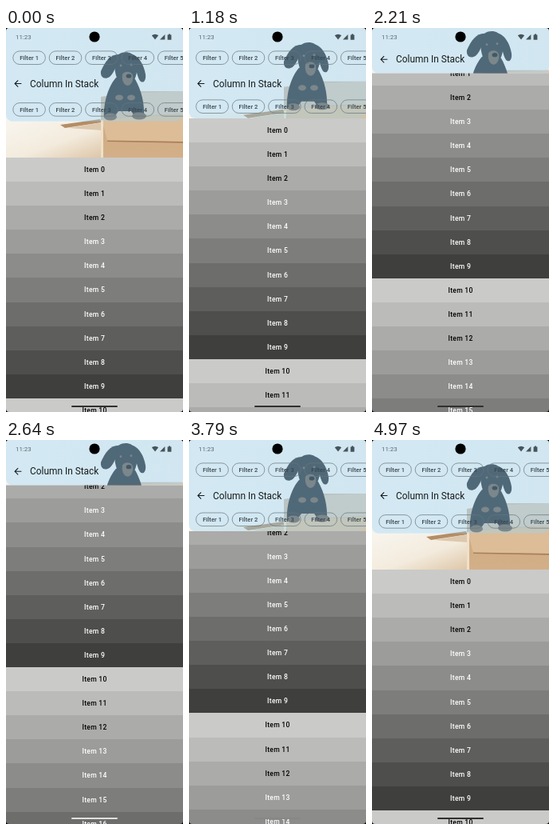
These frames come from a looping animation (222x480 px, 5 s). An HTML page:

```html
<!DOCTYPE html>
<html lang="en">
<head>
<meta charset="utf-8">
<title>Column In Stack</title>
<style>
  html, body { margin: 0; width: 100%; height: 100%; overflow: hidden; background: #000; }
  svg { display: block; width: 100vw; height: 100vh; font-family: Roboto, sans-serif; }
  #list rect { shape-rendering: crispEdges; }
  .item { font-size: 8.6px; font-weight: 500; letter-spacing: .27px; text-anchor: middle; }
  .chip text { font-size: 7.56px; font-weight: 500; letter-spacing: .06px; text-anchor: middle; fill: #3a464c; }
  .chip rect { fill: none; stroke: #66747c; stroke-width: .7; }
  .title { font-size: 11.9px; fill: #171c1f; }
  .clock { font-size: 7.9px; fill: #5c6a71; }
</style>
</head>
<body>
<svg viewBox="0 0 222 480">
  <defs>
    <linearGradient id="wall">
      <stop offset="0" stop-color="#f6f4ef"/>
      <stop offset="1" stop-color="#f3f0ec"/>
    </linearGradient>
    <linearGradient id="floor" x2=".9" y2="1">
      <stop offset="0" stop-color="#f8f5ee"/>
      <stop offset=".55" stop-color="#f3ebdd"/>
      <stop offset="1" stop-color="#dcc4a4"/>
    </linearGradient>
    <linearGradient id="card" x2="0" y2="1">
      <stop offset="0" stop-color="#cfa981"/>
      <stop offset="1" stop-color="#d6b48e"/>
    </linearGradient>
    <clipPath id="screen"><rect width="222" height="480" rx="4"/></clipPath>
    <clipPath id="headClip"><rect id="headBox" width="222" height="162"/></clipPath>
    <clipPath id="topClip"><rect y="22" width="222" height="60"/></clipPath>
    <clipPath id="lowClip"><rect y="86.8" width="222" height="60"/></clipPath>
  </defs>

  <g clip-path="url(#screen)">
  <g id="list"></g>

  <g clip-path="url(#headClip)">
    <g id="photo">
      <rect width="222" height="200" fill="url(#wall)"/>
      <rect y="118" width="122" height="50" fill="url(#floor)"/>
      <path d="M119 86L164 79H222V120H119Z" fill="#cdb9a3"/>
      <path d="M168 81L222 79V107L172 109Z" fill="#d8c7b3"/>
      <path d="M68 121L118 114L120 118L74 125Z" fill="#b48d66"/>
      <path d="M78 125L121 118V128Z" fill="#ddc8ad"/>
      <path d="M120 114L222 107V200H120Z" fill="url(#card)"/>
      <path d="M120 114L222 107V142L127 141Z" fill="#dcbd98"/>
      <path d="M127 140.5L222 142V143.8L127 142Z" fill="#a87f58"/>
      <path d="M119 115H122V200H119Z" fill="#efe0c9"/>
      <g fill="#272a2f">
        <path d="M138 62C129 72 122 92 123 112H135L141 104H157L162 111H173C174 95 170 78 162 64Z"/>
        <path d="M137 39C140 28 158 27 163 38C167 47 164 60 159 69C155 75 146 75 142 69C137 61 135 48 137 39Z"/>
        <path d="M141 33C131 33 124 42 119 54C118 62 124 65 130 61C136 56 140 44 141 33Z"/>
        <path d="M159 33C167 36 173 46 175 58C176 66 172 70 168 66C164 60 162 46 159 33Z"/>
      </g>
      <g fill="#6b5a4c">
        <path d="M146 58C149 53 157 54 159 59C160 66 157 72 152 72C147 71 145 64 146 58Z"/>
        <ellipse cx="142" cy="87" rx="5" ry="3.5"/>
        <ellipse cx="157" cy="87" rx="5" ry="3.5"/>
        <ellipse cx="131" cy="111" rx="8" ry="4.5"/>
        <ellipse cx="167" cy="110" rx="9" ry="4.5"/>
      </g>
      <ellipse cx="154" cy="60" rx="3.4" ry="2.6" fill="#101114"/>
      <circle cx="144" cy="47" r="1.4" fill="#6b5a4c"/>
      <circle cx="157" cy="46" r="1.4" fill="#6b5a4c"/>
    </g>
    <rect id="panel" y="-20" width="222" height="137" rx="8" fill="#96d4f6" fill-opacity=".37"/>
    <g clip-path="url(#topClip)"><g id="topRow" class="chip"></g></g>
    <g clip-path="url(#lowClip)"><g id="lowRow" class="chip"></g></g>
    <g id="bar">
      <path d="M19.4 69.5H11.2M15.2 65.4L11.1 69.5L15.2 73.6" fill="none" stroke="#171c1f" stroke-width="1.1"/>
      <text class="title" x="30" y="73.7">Column In Stack</text>
    </g>
  </g>

  <text class="clock" x="12" y="14">11:23</text>
  <circle cx="111" cy="11" r="6.6"/>
  <g fill="#46545b">
    <path d="M182.8 9.3Q187 6 191.2 9.3L187 14.6Z"/>
    <path d="M193 14.6L199.4 8V14.6Z"/>
    <path d="M202.6 8.4H204V7.5H206V8.4H207.4V14.8H202.6Z"/>
  </g>
  <rect id="handle" x="82" y="472" width="58" height="2.1" rx="1"/>
  </g>
</svg>
<script>
const LOOP = 5000, FULL = 162, PANEL = 116.7, ROWS = 86.8, MIN = 56.6, ITEM = 30.1;
const NS = 'http://www.w3.org/2000/svg';
const $ = id => document.getElementById(id);

function add(parent, tag, attrs, text) {
  const el = document.createElementNS(NS, tag);
  for (const k in attrs) el.setAttribute(k, attrs[k]);
  if (text) el.textContent = text;
  parent.append(el);
}

for (let i = 0; i < 18; i++) {
  const shade = Math.round(202 - 15.5 * (i % 10));
  add($('list'), 'rect', { y: i * ITEM, width: 222, height: ITEM + .3, fill: `rgb(${shade},${shade},${shade - 1})` });
  add($('list'), 'text', { class: 'item', x: 111.1, y: i * ITEM + 18, fill: i % 10 < 3 ? '#000' : '#fff' }, 'Item ' + i);
}

function addChips(row, y) {
  for (let i = 0; i < 5; i++) {
    const x = 8.8 + i * 45.4;
    add(row, 'rect', { x, y: y - 8.3, width: 40.6, height: 16.6, rx: 8.3 });
    add(row, 'text', { x: x + 20.3, y: y + 2.7 }, 'Filter ' + (i + 1));
  }
}
addChips($('topRow'), 37.2);
addChips($('lowRow'), 101.9);

// Drag positions: [time, scroll, speed in px/ms]
const keys = [
  [0, 0, .02], [1180, 49, .048], [1610, 72, .08], [2210, 150, .11], [2650, 179, 0],
  [2780, 179, 0], [3120, 167, -.055], [3790, 121.6, -.067], [4450, 76, -.12], [4960, 0, 0], [LOOP, 0, 0]
];
const TURN = 2715, PEAK = 179;

function scrollAt(t) {
  const i = keys.findIndex(k => k[0] > t);
  const [t0, a, va] = keys[i - 1], [t1, b, vb] = keys[i];
  const d = t1 - t0, u = (t - t0) / d, w = 1 - u;
  return w * w * ((1 + 2 * u) * a + u * d * va) + u * u * ((3 - 2 * u) * b - w * d * vb);
}

const ramp = (t, from, to) => Math.min(1, Math.max(0, (t - from) / (to - from)));
const shift = (id, y) => $(id).setAttribute('transform', `translate(0 ${y.toFixed(2)})`);

function draw(now) {
  const t = now % LOOP, s = scrollAt(t);
  // The header collapses first and re-expands as soon as the drag reverses.
  const h = t < TURN ? Math.max(MIN, FULL - s) : Math.min(FULL, MIN + PEAK - s);
  const rise = Math.min(0, h - ROWS);
  shift('list', FULL - s);
  shift('photo', (h - FULL) * .25);
  shift('topRow', rise);
  shift('bar', rise);
  shift('lowRow', Math.min(0, h - PANEL));
  $('headBox').setAttribute('height', h);
  $('panel').setAttribute('height', Math.min(h, PANEL) + 20);
  // The handle turns light over dark rows.
  const tone = Math.round(48 + 176 * (ramp(t, 2400, 2600) - ramp(t, 3690, 3890)));
  $('handle').setAttribute('fill', `rgb(${tone},${tone},${tone})`);
}

const start = performance.now();
function tick() {
  draw(performance.now() - start);
  requestAnimationFrame(tick);
}
draw(0);
requestAnimationFrame(tick);
</script>
</body>
</html>
```
